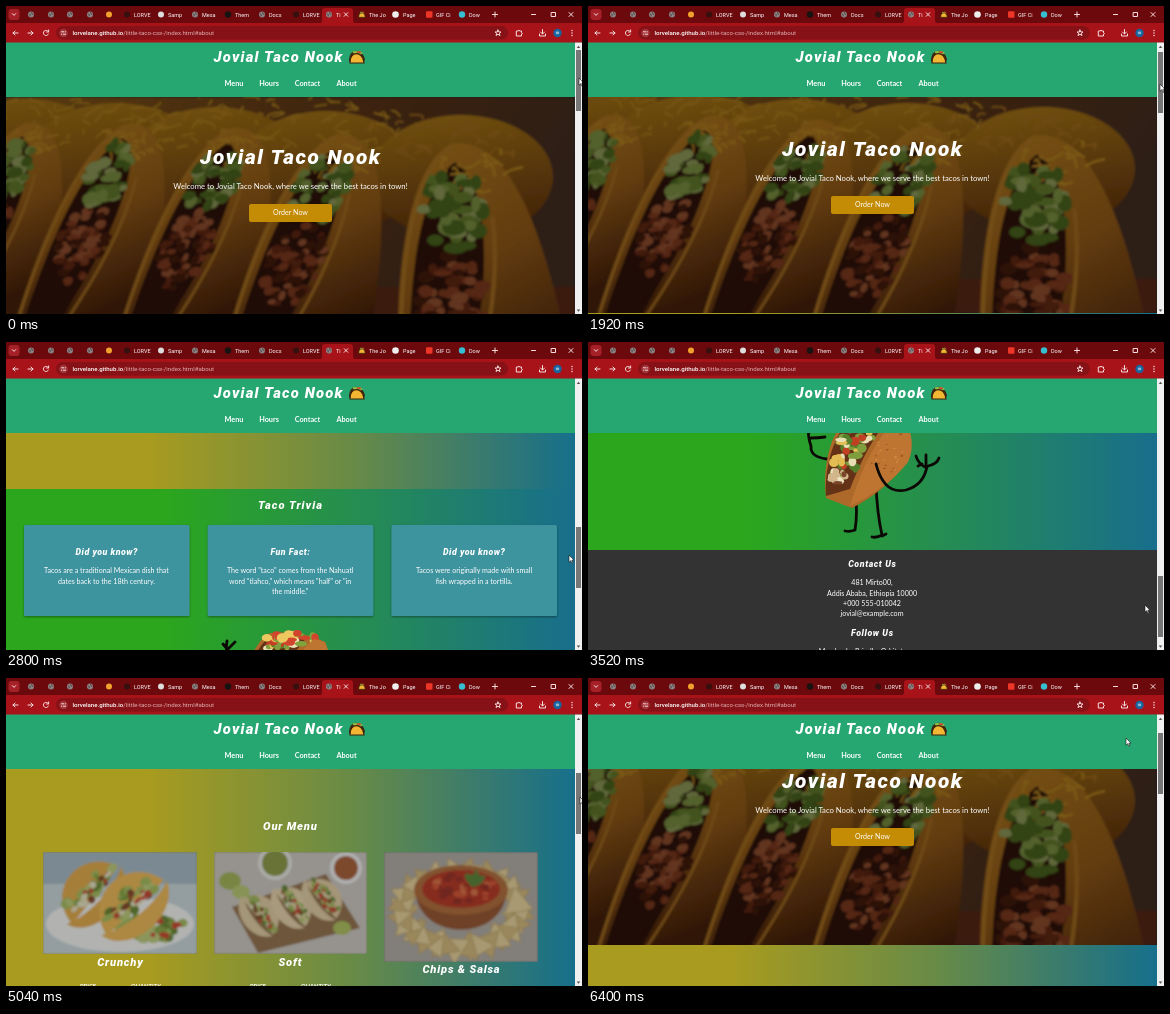
Animation of 576x308 px, one loop 6.48 s. Source, as an HTML page:

```html
<!DOCTYPE html>
<html lang="en">
<head>
<meta charset="utf-8">
<title>Taco shop page</title>
<style>
  html, body { margin: 0; width: 100%; height: 100%; overflow: hidden; background: #333; }
  svg { display: block; }
  #stage { width: 576px; height: 308px; }
  text { font-family: Lato, sans-serif; fill: #fff; text-anchor: middle; white-space: pre; }
  .display { font-family: Roboto, sans-serif; font-weight: 900; font-style: italic; }
  .bold { font-weight: 700; }
  .ui { font-family: Roboto, sans-serif; text-anchor: start; }
  .line { fill: none; stroke: #f6dede; stroke-width: 1; stroke-linecap: round; stroke-linejoin: round; }
  .limb { fill: none; stroke: #0b0805; stroke-width: 2.8; stroke-linecap: round; stroke-linejoin: round; }
</style>
</head>
<body>
<svg id="stage" viewBox="0 0 576 308">
  <defs>
    <linearGradient id="olive"><stop offset=".25" stop-color="#a89b1f"/><stop offset=".62" stop-color="#668a48"/><stop offset="1" stop-color="#166f8b"/></linearGradient>
    <linearGradient id="green"><stop offset=".28" stop-color="#2ba61d"/><stop offset=".62" stop-color="#258d52"/><stop offset="1" stop-color="#186e8c"/></linearGradient>
    <linearGradient id="shell" x2=".35" y2="1"><stop stop-color="#e09a26"/><stop offset=".5" stop-color="#b9711d"/><stop offset="1" stop-color="#5a290c"/></linearGradient>
    <linearGradient id="ridge" x2=".2" y2="1"><stop stop-color="#d99a1c"/><stop offset="1" stop-color="#7d420f"/></linearGradient>
    <linearGradient id="backdrop" x2="1" y2=".3"><stop stop-color="#a8701a"/><stop offset=".6" stop-color="#70401a"/><stop offset="1" stop-color="#54392c"/></linearGradient>
    <filter id="shadow"><feDropShadow dx="0" dy="1" stdDeviation="1.2" flood-opacity=".4"/></filter>
    <filter id="soft"><feGaussianBlur stdDeviation=".8"/></filter>
    <clipPath id="view"><rect y="36" width="569" height="272"/></clipPath>
  </defs>
  <g clip-path="url(#view)"><g id="page"></g></g>
  <g id="chrome"></g>
  <rect id="thumb" x="570" width="5" height="61" fill="#777"/>
  <path id="cursor" d="M0 0V7.2L1.7 5.7L3 8.4L4 7.9L2.8 5.2H5Z" fill="#fff" stroke="#111" stroke-width=".6"/>
</svg>
<script>
const $ = id => document.getElementById(id);
const SHOP = 'Jovial Taco Nook';

let seed = 11;
const rnd = () => (seed = (seed * 16807) % 2147483647) / 2147483647;
const span = r => (rnd() * 2 - 1) * r;
const many = (n, fn) => Array.from({ length: n }, (_, i) => fn(i)).join('');

const text = (x, y, s, size = 7.1, cls = '', gap = 0) =>
  `<text x="${x + gap / 2}" y="${y + size * .35}" font-size="${size}" class="${cls}" letter-spacing="${gap}">${s}</text>`;
const title = (x, y, s, size, gap) => text(x, y, s, size, 'display', gap);
const rect = (x, y, w, h, fill, more = '') => `<rect x="${x}" y="${y}" width="${w}" height="${h}" fill="${fill}" ${more}/>`;
const oval = (x, y, rx, ry, fill, more = '') => `<ellipse cx="${x}" cy="${y}" rx="${rx}" ry="${ry}" fill="${fill}" ${more}/>`;
const dot = (x, y, r, fill) => oval(x, y, r, r, fill);
const path = (d, fill, more = '') => `<path d="${d}" fill="${fill}" ${more}/>`;
const line = (d, more = '') => `<path d="${d}" class="line" ${more}/>`;
const group = (t, s) => `<g transform="${t}">${s}</g>`;
const photo = (x, y, w, h, s, shade) =>
  `<svg x="${x}" y="${y}" width="${w}" height="${h}" overflow="hidden"><g filter="url(#soft)">${s}</g>${rect(0, 0, w, h, shade)}</svg>`;
const pick = list => list[Math.floor(rnd() * list.length)];

// Scatter of small blobs in a slanted ellipse
const crumbs = (n, x, y, rx, ry, size, colors, tilt = 0) => many(n, () => {
  const a = rnd() * 6.283, r = Math.sqrt(rnd()), v = Math.sin(a) * r * ry;
  return oval(x + Math.cos(a) * r * rx - v * tilt, y + v, size * (.6 + rnd()), size * (.5 + rnd() * .7), pick(colors));
});
const shreds = (n, x, y, rx, ry, color) => many(n, () =>
  path(`M${x + span(rx)} ${y + span(ry)}q${span(8)} ${-3 + span(4)} ${span(16)} ${span(10)}`, 'none', `stroke="${color}" stroke-width="1.6"`));

const MEAT = ['#7a3018', '#a04a26', '#54200f', '#b8633a'];
const LEAF = ['#7f9d38', '#9db653', '#5f7f25', '#b5c470'];

// Leaning taco: lettuce at the origin, meat below it, shell to the right
function bigTaco(x, y, k, lean) {
  return group(`translate(${x} ${y}) scale(${k}) skewX(${-lean})`,
    path('M-38 165C-46 60-34-28 0-44C46-50 74 30 96 165Z', 'url(#shell)') +
    path('M-30 165C-36 60-24-12 2-30C28-18 30 60 12 125L4 165Z', '#3a170a') +
    crumbs(75, 0, 76, 25, 38, 4.2, MEAT) +
    shreds(22, 14, -22, 24, 14, '#e8a92c') +
    crumbs(42, 1, 6, 23, 32, 5.5, LEAF) +
    path('M-36 165C-43 60-32-24 0-42', 'none', 'stroke="#d8912c" stroke-width="3"') +
    path('M30 10C36 60 26 110 8 165', 'none', 'stroke="#d08a2a" stroke-width="3"'));
}

const heroPhoto = () => photo(0, 91, 569, 224,
  rect(0, 0, 569, 224, 'url(#backdrop)') + rect(0, 190, 569, 34, '#71331f') +
  [20, 110, 210, 320, 455].map((x, i) => oval(x, 64 + i * 4, 92, 62, 'url(#ridge)')).join('') +
  shreds(110, 190, 26, 200, 24, '#dfa328') + shreds(40, 440, 40, 75, 18, '#cf8a26') +
  bigTaco(4, 68, .95, 20) + bigTaco(104, 71, 1, 20) + bigTaco(209, 76, 1.02, 20) +
  bigTaco(314, 86, 1.1, 18) + bigTaco(446, 106, 1.35, 0), 'rgba(0,0,0,.47)');

// Small folded taco, opening upwards
const smallTaco = (x, y, k, turn, shell) => group(`translate(${x} ${y}) rotate(${turn}) scale(${k})`,
  path('M-34 8C-30-36 26-40 38 0Z', shell) +
  crumbs(24, 2, -5, 32, 10, 4, LEAF) + crumbs(15, 2, -2, 27, 8, 3, ['#c23a25', '#e0dcb8', '#7c3b1c']) +
  path('M-38 4C-30 34 28 36 40 2C22 12-16 14-38 4Z', shell));

const crunchy = () => photo(37, 400, 154, 102,
  rect(0, 0, 154, 102, '#c2d0d4') + rect(0, 0, 154, 32, '#9eb4bf') + oval(77, 72, 74, 28, '#eef0ec') +
  crumbs(30, 110, 75, 34, 13, 5, LEAF) + crumbs(12, 118, 75, 26, 10, 3, ['#c43c24']) +
  smallTaco(48, 42, 1.02, -45, '#dba23c') + smallTaco(88, 54, 1.1, -38, '#e6b04a'), 'rgba(50,50,50,.32)');

const soft = () => photo(208, 400, 153, 102,
  rect(0, 0, 153, 102, '#c9c5bd') + path('M18 55L112 22L146 76L44 101Z', '#8c673f') +
  dot(61, 11, 17, '#e8e8e2') + dot(61, 11, 13, '#85943a') + dot(132, 16, 16, '#eee') + dot(132, 16, 12, '#a3552c') +
  oval(16, 29, 11, 9, '#9cb04c') + oval(27, 40, 9, 7, '#b2c568') +
  smallTaco(45, 62, .65, 55, '#dfc99c') + smallTaco(77, 54, .65, 55, '#e5d0a5') + smallTaco(108, 46, .65, 55, '#dfc99c') +
  oval(128, 76, 9, 7, '#a9bd52'), 'rgba(50,50,50,.34)');

const chips = () => photo(378, 400, 154, 110,
  rect(0, 0, 154, 110, '#aaa49c') +
  many(34, i => group(`translate(${77 + Math.cos(i * .185) * 58} ${58 + Math.sin(i * .185) * 37}) rotate(${i * 47})`,
    path('M-14 9L0-16L15 9Z', i % 2 ? '#e2cc92' : '#cdb171', 'stroke="#ad9055" stroke-width=".6"'))) +
  path('M31 38C34 91 120 91 123 38Z', '#8d4a20') + oval(77, 38, 47, 25, '#a9622d') + oval(77, 37, 39, 19, '#b02b17') +
  crumbs(34, 77, 37, 34, 15, 3, ['#cf4a27', '#8f2012', '#d8693a']) +
  path('M88 35Q77 24 83 21Q90 26 92 16Q95 27 102 23Q99 34 88 35Z', '#4f7b2b'), 'rgba(50,50,50,.33)');

function dish(x, y, name, prices) {
  return title(x, y, name, 11.2, .8) +
    text(x - 32, y + 23.5, 'PRICE', 5.8, 'bold') + text(x + 26, y + 23.5, 'QUANTITY', 5.8, 'bold') +
    prices.map((p, i) => text(x - 32, y + 37 + i * 13, p) + text(x + 26, y + 37 + i * 13, i * 2 + 1)).join('');
}

const card = (x, heading, lines) =>
  rect(x, 809, 165.5, 91, '#3c939e', 'rx="1.5" filter="url(#shadow)"') + title(x + 82.5, 836, heading, 8.8, .5) +
  lines.map((s, i) => text(x + 82.5, 855 + i * 10.2, s)).join('');

const mascot = () =>
  `<g class="limb"><path d="M239 961Q222 959 223 948Q219 937 221 925M223 940Q230 940 237 939M222 934L217 928M223 932L229 926"/>
  <path d="M267 992Q270 1014 267 1032Q262 1034 257 1033M288 986Q289 1015 294 1037Q289 1040 284 1039M294 1038L298 1036"/></g>` +
  path('M238 1000C234 970 242 930 264 917Q298 914 319 926Q327 950 319 964Q296 994 264 1010Z', '#ad6929') +
  path('M238 998C236 970 246 932 266 919L302 920Q280 944 262 991Z', '#643317') +
  crumbs(55, 265, 950, 17, 31, 4, ['#c13f23', '#7f9e3d', '#e3bd51', '#55802b', '#e9dfb5'], .5) +
  crumbs(22, 287, 923, 28, 6, 4, ['#d2442b', '#7fa43e', '#ecc85f', '#e7dfb0']) +
  crumbs(14, 249, 977, 8, 8, 3.5, ['#eee3c2', '#d2b68b', '#79462a']) +
  path('M308 923Q281 945 262 1008Q300 990 320 964Q328 946 319 926Z', '#bd7531') +
  crumbs(26, 299, 958, 17, 25, 1, ['#9a5923', '#d08b42'], .4) +
  `<path class="limb" d="M288 966Q296 997 318 992Q336 987 339 968M339 970Q330 966 328 958M338 967L338 957M340 968Q349 966 351 960M334 966L330 968"/>`;

$('page').innerHTML =
  rect(0, 315, 569, 458, 'url(#olive)') + rect(0, 773, 569, 279, 'url(#green)') + rect(0, 1052, 569, 140, '#333') +
  heroPhoto() +
  title(284, 151, SHOP, 20.8, 1.6) +
  text(284.5, 180, `Welcome to ${SHOP}, where we serve the best tacos in town!`, 7.7) +
  rect(243, 198, 83, 18, '#c48b04', 'rx="2"') + text(284.5, 207, 'Order Now') +
  title(284, 374, 'Our Menu', 11.2, .8) +
  crunchy() + soft() + chips() +
  dish(114, 510, 'Crunchy', ['$1.50', '$4.00', '$6.50']) +
  dish(284, 510, 'Soft', ['$2.00', '$5.00', '$8.00']) +
  dish(455, 517, 'Chips &amp; Salsa', ['$2.50', '$6.00', '$9.00']) +
  title(284, 789, 'Taco Trivia', 11.2, 1) +
  card(18, 'Did you know?', ['Tacos are a traditional Mexican dish that', 'dates back to the 18th century.']) +
  card(201.7, 'Fun Fact:', ['The word "taco" comes from the Nahuatl', 'word "tlahco," which means "half" or "in', 'the middle."']) +
  card(385.5, 'Did you know?', ['Tacos were originally made with small', 'fish wrapped in a tortilla.']) +
  mascot() +
  title(284, 1066, 'Contact Us', 8.8, .6) +
  ['481 Mirto00,', 'Addis Ababa, Ethiopia 10000', '+000 555-010042', 'jovial@example.com']
    .map((s, i) => text(284, 1085 + i * 10.2, s)).join('') +
  title(284, 1135, 'Follow Us', 8.8, .6) +
  text(275, 1153.5, 'Meadowly  Brindle  Orbitato');

const tacoIcon = (x, y, k) => group(`translate(${x} ${y}) scale(${k})`,
  path('M-8 4C-8-10 6-9 8 3L5 6H-6Z', '#3f220f') + crumbs(9, 0, -3, 5, 2.5, 1.7, ['#71a43a', '#d54833', '#95bd45']) +
  path('M-7 6C-8-6 6-7 7 6Z', '#f3b632', 'stroke="#3a210b" stroke-width="1.2"'));
const globe = x => dot(x, 8.5, 3, '#8d8585') + line(`M${x - 1.7} 7.5q1.5 1 1 2.5M${x + .5} 6.5q-.5 1.5 1.5 2`, 'stroke-width=".6" style="stroke:#4f4040"');
const tab = (x, s) => `<text x="${x}" y="10.5" font-size="5.5" class="ui">${s}</text>`;

$('chrome').innerHTML =
  rect(0, 36, 569, 55, '#26a772') +
  title(272, 51, SHOP, 14.8, 1.2) + tacoIcon(351, 51, 1) +
  [['Menu', 228], ['Hours', 263], ['Contact', 301.5], ['About', 340.5]].map(([s, x]) => text(x, 77.5, s, 7.3, 'bold')).join('') +
  rect(0, 0, 576, 18, '#6c090c') + rect(0, 17, 576, 19.5, '#a81319') +
  path('M313 17.5Q316 17.5 316 14V5Q316 2 319 2H344Q347 2 347 5V14Q347 17.5 350 17.5Z', '#a81319') +
  rect(2.5, 3, 11, 11, '#a52127', 'rx="3"') + line('M6.3 7.6L8 9.4L9.7 7.6') +
  [25, 45, 64, 84, 189, 256, 323].map(globe).join('') +
  dot(103, 8.5, 3, '#f0a22c') + dot(121, 8.5, 3, '#35100e') + dot(155, 8.5, 3, '#ddd') +
  dot(222, 8.5, 3.2, '#171313') + dot(290, 8.5, 3, '#35100e') + tacoIcon(356, 8.5, .46) +
  dot(389.5, 8.5, 3.3, '#eee') + rect(420, 5.2, 6.5, 6.5, '#ed3528', 'rx="1"') + dot(456, 8.5, 3.2, '#35bdd2') +
  [[128, 'LORVE'], [162, 'Samp'], [196, 'Mesa'], [229, 'Them'], [263, 'Docs'], [297, 'LORVE'], [330, 'Ti'],
   [363, 'The Jo'], [397, 'Page'], [430, 'GIF Ci'], [463, 'Dow']].map(([x, s]) => tab(x, s)).join('') +
  line('M338.2 6.7l3.6 3.6m0-3.6l-3.6 3.6M486.5 8.5h5M489 6v5M525.5 8.5h4M545.5 6.5h4v4h-4ZM563 6.5l4 4m0-4l-4 4', 'stroke-width=".8"') +
  rect(50, 20, 452, 13.5, '#861116', 'rx="6.7"') +
  line('M12 27H7m2-2l-2 2l2 2M22 27h5m-2-2l2 2l-2 2M42.2 25.5a2.6 2.6 0 1 0 .2 2.6M42.6 24v2h-2') +
  dot(57.5, 27, 4.3, '#a2353a') + line('M55.5 25.8h2.3M59.3 25.8h.2M55.5 28.2h.2M57.3 28.2h2.3', 'stroke-width=".8"') +
  `<text x="66.5" y="29" font-size="6.1" class="ui"><tspan font-weight="500">lorvelane.github.io</tspan><tspan fill="#e3b1b3">/little-taco-css-/index.html#about</tspan></text>` +
  line('M492 24l.9 2h2.1l-1.7 1.4l.7 2.1l-2-1.2l-2 1.2l.7-2.1l-1.7-1.4h2.1Z', 'stroke-width=".7"') +
  line('M510.7 25h1.6q.7-2 1.4 0h1.8v1.8q2 .7 0 1.4v1.8h-4.8Z') +
  line('M536.5 23.5v4.3m-2-1.8l2 2l2-2M533.5 28v2h6v-2') +
  dot(551.5, 27, 4.2, '#18649d') + rect(549.8, 25.6, 3.4, 2.6, '#8bb7d6', 'rx="1"') +
  [24.5, 27, 29.5].map(y => dot(566, y, .65, '#fff')).join('') +
  rect(569, 36.5, 7, 272, '#f0f0f0') + path('M570.7 42L572.5 39.7L574.3 42Z', '#555') + path('M570.7 303.5L572.5 305.8L574.3 303.5Z', '#555');

// time, scroll, pointer x, pointer y
const KEYS = [
  [0, 0, 573, 72], [1280, 0, 572, 71], [1680, 0, 572, 72], [1920, 8, 572, 78],
  [2800, 626, 563, 213], [3520, 844, 557, 263], [3840, 862, 558, 267],
  [5040, 226, 574, 119], [5800, 48, 572, 82], [6400, 48, 538, 60], [6480, 48, 538, 60]
];
const LOOP = 6480, TICK = 80;

const rate = (i, c) => KEYS[i + 1] ? (KEYS[i + 1][c] - KEYS[i][c]) / (KEYS[i + 1][0] - KEYS[i][0]) : 0;
function slope(i, c) {
  if (i === 0) return 0;
  const a = rate(i - 1, c), b = rate(i, c);
  return a * b > 0 ? 2 * a * b / (a + b) : 0;
}
function sample(t, c) {
  let i = 0;
  while (i < KEYS.length - 2 && t >= KEYS[i + 1][0]) i++;
  const a = KEYS[i], b = KEYS[i + 1], d = b[0] - a[0], u = (t - a[0]) / d, v = 1 - u;
  return v * v * ((1 + 2 * u) * a[c] + u * d * slope(i, c)) + u * u * ((1 + 2 * v) * b[c] - v * d * slope(i + 1, c));
}

function draw(now) {
  const t = Math.floor(now % LOOP / TICK) * TICK;
  const scroll = Math.round(sample(t, 1));
  $('page').setAttribute('transform', `translate(0 ${-scroll})`);
  $('thumb').setAttribute('y', Math.round(44 + scroll * .225));
  $('cursor').setAttribute('transform', `translate(${Math.round(sample(t, 2))} ${Math.round(sample(t, 3))})`);
}
const start = performance.now();
function loop() {
  draw(performance.now() - start);
  requestAnimationFrame(loop);
}
loop();
</script>
</body>
</html>
```
